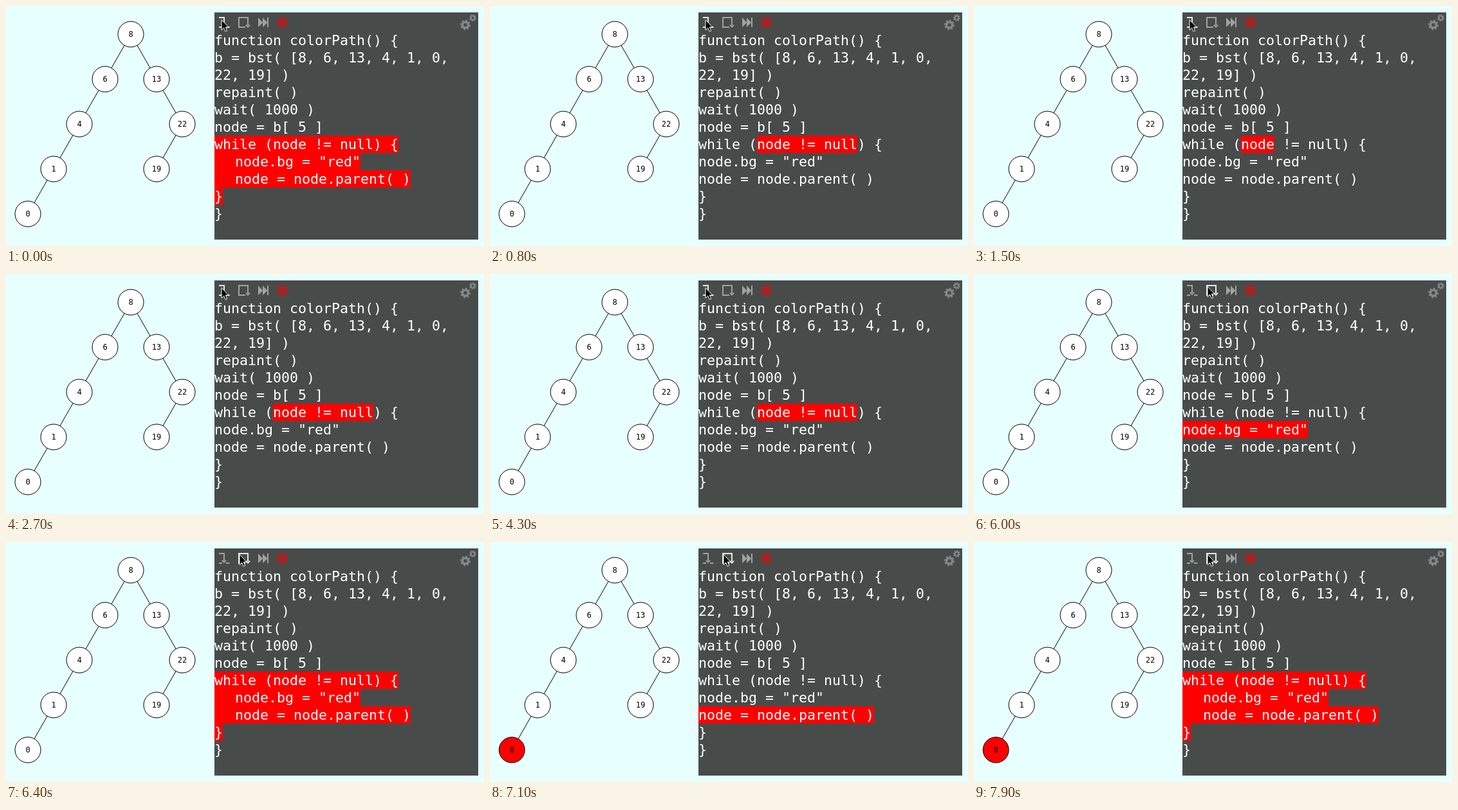
An HTML page that plays this animation: 743 by 374 pixels, repeating every 8000 ms.

```html
<!DOCTYPE html>
<html lang="en">
<head>
<meta charset="utf-8">
<title>Stepping through colorPath</title>
<style>
html, body { margin: 0; width: 100%; height: 100%; overflow: hidden; background: #e8ffff; }
svg { position: absolute; left: 0; top: 0; }
.panel { position: absolute; left: 324px; top: 10px; width: 410px; height: 354px; background: #474c4b; }
.code { position: absolute; left: 324px; top: 40px; color: #fff; white-space: pre;
  font: 21.6px/27px "DejaVu Sans Mono", monospace; }
.code div { height: 27px; }
.code span { display: inline-block; height: 27px; vertical-align: top; }

.tree text { font: 12px "DejaVu Sans Mono", monospace; text-anchor: middle; }
.tree line, .tree circle { stroke: #000; stroke-width: 1; }
.tree circle { fill: #fff; }

.icon { fill: none; stroke: #a0a2a2; stroke-width: 2; }
.solid { fill: #a0a2a2; }
.gear { fill: none; stroke: #858888; }

/* All parts share one 8 s clock with hard switches. */
.block, .body, .left, .op, .right, .paint, .climb, .into, .over, .leaf {
  animation: 8s step-end infinite; }
.block { animation-name: block; }
.body { animation-name: block, indent; }
.left { animation-name: left; }
.op { animation-name: op; }
.right { animation-name: right; }
.paint { animation-name: paint; }
.climb { animation-name: climb; }
.into { animation-name: into; }
.over { animation-name: over; }
.tree .leaf { animation-name: leaf; }
.cursor { animation: move 8s linear infinite; }

@keyframes block {
  0%, 70%, 80%, 98.75%, 100% { background: #f00; }
  10%, 75%, 88.75% { background: transparent; }
}
@keyframes indent {
  0%, 70%, 80%, 98.75%, 100% { padding-left: 32px; }
  10%, 75%, 88.75% { padding-left: 0; }
}
@keyframes left {
  0%, 40%, 70%, 100% { background: transparent; }
  10%, 53.75% { background: #f00; }
}
@keyframes op {
  0%, 18.75%, 40%, 70%, 100% { background: transparent; }
  10%, 33.75%, 53.75% { background: #f00; }
}
@keyframes right {
  0%, 18.75%, 70%, 100% { background: transparent; }
  10%, 33.75% { background: #f00; }
}
@keyframes paint {
  0%, 80%, 100% { background: transparent; }
  75% { background: #f00; }
}
@keyframes climb {
  0%, 98.75%, 100% { background: transparent; }
  88.75% { background: #f00; }
}
@keyframes into {
  0% { stroke: #e8e8e8; }
  67.5%, 100% { stroke: #a0a2a2; }
}
@keyframes over {
  0% { stroke: #a0a2a2; }
  67.5%, 100% { stroke: #e8e8e8; }
}
@keyframes leaf {
  0% { fill: #fff; }
  88.75%, 100% { fill: #f00; }
}
@keyframes move {
  0% { transform: translate(335px, 21.5px); }
  62.5% { transform: translate(335px, 21.5px); animation-timing-function: steps(6, start); }
  70%, 100% { transform: translate(363px, 19.5px); }
}
</style>
</head>
<body>
<div class="panel"></div>
<div class="code"><div>function colorPath() {</div><div>b = bst( [8, 6, 13, 4, 1, 0,</div><div>22, 19] )</div><div>repaint( )</div><div>wait( 1000 )</div><div>node = b[ 5 ]</div><div><span class="block">while (<span class="left">node</span><span class="op"> != </span><span class="right">null</span>) {</span></div><div><span class="body"><span class="paint">node.bg = "red"</span></span></div><div><span class="body"><span class="climb">node = node.parent( )</span></span></div><div><span class="block">}</span></div><div>}</div></div>

<svg width="743" height="374">
  <g class="tree" id="tree"></g>

  <g class="icon into">
    <path d="M331 18H339V29M331 33H336M342 33H347.500"/>
    <path d="M336 28.500L339 31.500L342 28.500"/>
  </g>
  <g class="icon over">
    <path d="M372 33H362V18H376V30"/>
    <path d="M373 29.500L376 32.500L379 29.500"/>
  </g>
  <path class="solid" d="M392 18L399 25.500V18L406 25.500V18H408V33H406V26L399 33V26L392 33Z"/>
  <rect x="422" y="18" width="15" height="15" fill="#a52424"/>

  <g class="gear">
    <circle cx="714" cy="29.500" r="4.500" stroke-width="3.400"/>
    <circle cx="714" cy="29.500" r="6.900" stroke-width="2.400" pathLength="16" stroke-dasharray="1"/>
    <circle cx="725.500" cy="18.500" r="3" stroke-width="2.200"/>
    <circle cx="725.500" cy="18.500" r="4.700" stroke-width="1.800" pathLength="16" stroke-dasharray="1"/>
  </g>

  <path class="cursor" fill="#000" stroke="#fff"
    d="M0 0V16L3.700 12.600L6.200 18.300L8.700 17.200L6.300 11.600H11Z"/>
</svg>

<script>
// Each node: label, x, y, index of its parent.
const nodes = [
  [8, 194, 44], [6, 154, 114, 0], [13, 234, 114, 0], [4, 114, 184, 1],
  [22, 274, 184, 2], [1, 74, 254, 3], [19, 234, 254, 4], [0, 34, 324, 5]
];
const tree = document.getElementById("tree");

function add(tag, attrs, label = "") {
  const el = document.createElementNS("http://www.w3.org/2000/svg", tag);
  for (const key in attrs) el.setAttribute(key, attrs[key]);
  el.textContent = label;
  tree.append(el);
}

for (const [, x, y, parent] of nodes) {
  if (parent === undefined) continue;
  const [, px, py] = nodes[parent];
  add("line", { x1: px, y1: py, x2: x, y2: y });
}
for (const [label, x, y] of nodes) {
  add("circle", { cx: x, cy: y, r: 20, class: label === 0 ? "leaf" : "node" });
  add("text", { x, y: y + 4 }, label);
}
</script>
</body>
</html>
```
